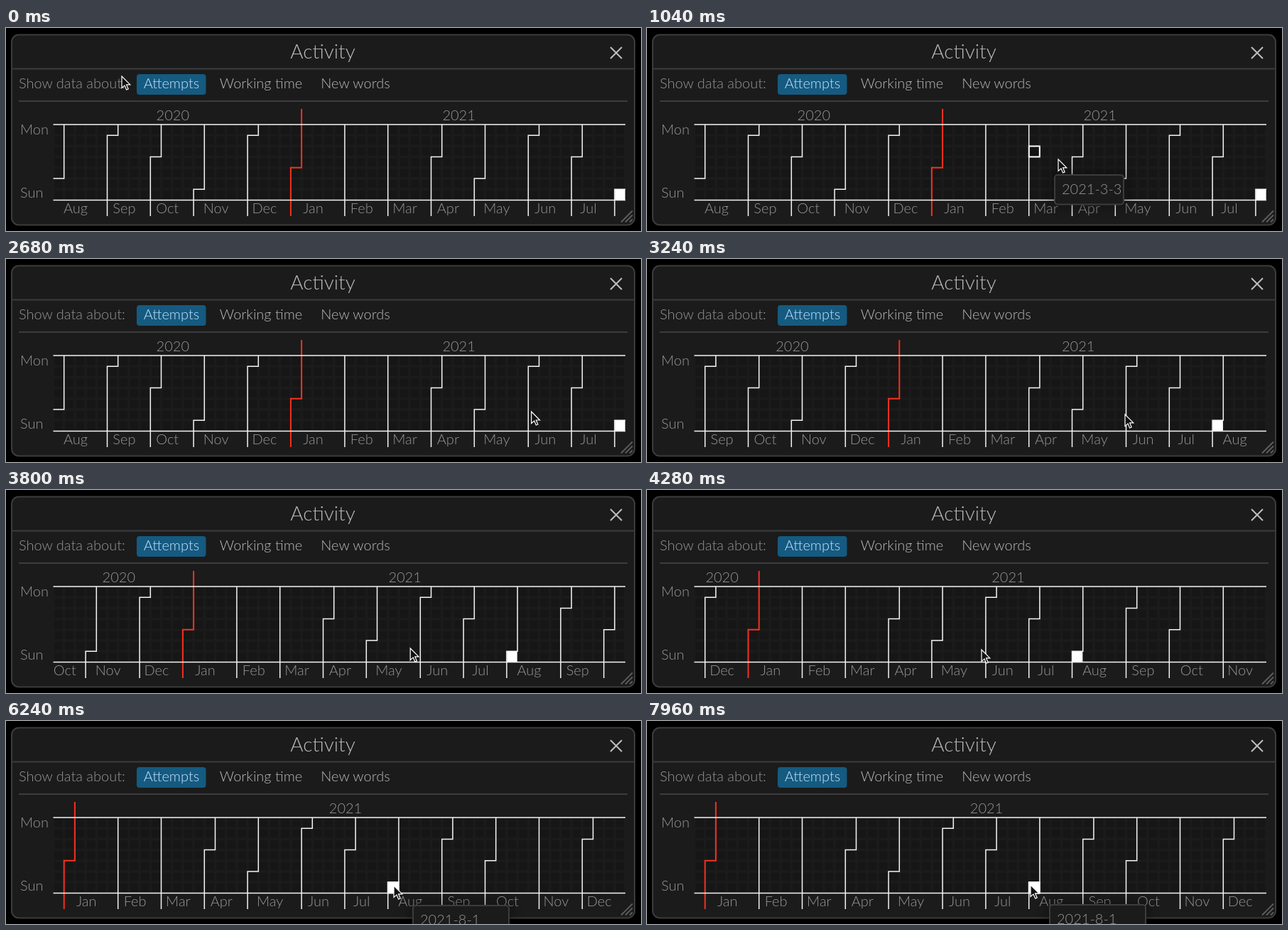
Write an HTML page that moves like this. It is 894 px wide and 286 px high and loops after 8 s.

```html
<!DOCTYPE html>
<html lang="en">
<head>
<meta charset="utf-8">
<title>Activity</title>
<style>
html, body { margin: 0; width: 100%; height: 100%; overflow: hidden; background: #000; }
svg { display: block; width: 894px; height: 286px; }
text { font: 300 20px Lato, sans-serif; fill: #969696; }
.bright { fill: #b9b9b9; }
.mid { text-anchor: middle; }
.edge { stroke: #3c3c3c; stroke-width: 2; }
.line { fill: none; stroke: #f4f4f4; stroke-width: 1.5; }
.year { stroke: #f5301f; stroke-width: 2; }
</style>
</head>
<body>
<svg viewBox="0 0 894 286">
  <defs>
    <pattern id="cells" x="66.5" y="136" width="15.2" height="15.2" patternUnits="userSpaceOnUse">
      <rect x="1.6" y="1.6" width="12" height="12" rx="1" fill="#161616"/>
    </pattern>
    <filter id="blur" x="-50%" y="-80%" width="200%" height="260%"><feGaussianBlur stdDeviation="7"/></filter>
  </defs>
  <rect width="894" height="286"/>
  <rect class="edge" x="8" y="9.5" width="877" height="268" rx="10" fill="#1b1b1b"/>
  <path class="edge" d="M9 57.5H884M18 103H875"/>
  <text class="bright mid" x="446" y="43" style="font-size:28px">Activity</text>
  <path d="M851 27l16 16m0-16l-16 16" stroke="#bebebe" stroke-width="2"/>
  <path d="M866 273.500l16-16M872 273.500l10-10M878 273.500l4-4" stroke="#5f5f5f" stroke-width="1.8"/>

  <text x="18" y="85">Show data about:</text>
  <rect x="184" y="65" width="97.500" height="29" rx="4" fill="#155a80"/>
  <text class="mid" x="233" y="85" style="fill:#c8e4ff">Attempts</text>
  <text class="bright mid" x="359" y="85">Working time</text>
  <text class="bright mid" x="492" y="85">New words</text>

  <text x="20" y="150">Mon</text>
  <text x="20" y="239">Sun</text>
  <rect x="66.500" y="136" width="805.600" height="106.400" fill="url(#cells)"/>
  <g id="chart"></g>
  <rect id="hover" width="15" height="15" fill="#121212" stroke="#fff" stroke-width="2"/>
  <rect id="today" width="14.400" height="14.400" fill="#fff"/>
  <path class="line" d="M66.500 136H872M66.500 242.400H872"/>
  <g id="tip">
    <rect id="shade" x="-6" y="-6" rx="8" opacity=".25" filter="url(#blur)"/>
    <rect id="box" class="edge" rx="4" fill="#1b1b1b"/>
    <text id="date" x="10" y="27"></text>
  </g>
  <path id="cursor" d="M0 0V16.500L4 12.900L6.600 19L9.200 17.900L6.600 11.900H11.800Z" fill="#111" stroke="#fff" stroke-width="1.2"/>
</svg>
<script>
const $ = id => document.getElementById(id);
const LOOP = 8000, STEP = 40, LAG = 120;
const LEFT = 66.5, TOP = 136, CELL = 15.2, COLS = 53, ROWS = 7;
const DAY = 864e5, BASE = Date.UTC(2020, 6, 27), TODAY = 370;
const PRESS = 2200, RELEASE = 5040, GRAB_X = 755;
const MONTHS = 'Jan Feb Mar Apr May Jun Jul Aug Sep Oct Nov Dec'.split(' ');

// Pointer path: time, x, y
const path = [
  [0, 163, 68], [120, 200, 63], [350, 350, 95], [570, 470, 152],
  [720, 521, 174], [920, 547, 179], [1040, 579, 185], [1600, 716, 207],
  [1720, 739, 213], [1800, 755, 214], [2360, 755, 214], [3240, 673, 219],
  [4280, 471, 225], [4560, 428, 218], [5000, 428, 218], [5360, 462, 215],
  [5480, 498, 220], [5720, 513, 225], [6120, 546, 232], [7800, 546, 232],
  [7840, 540, 231], [LOOP, 540, 231]
];

const slope = (i, k) => (path[i + 1][k] - path[i][k]) / (path[i + 1][0] - path[i][0]);

function tangent(i, k) {
  if (i === 0 || i === path.length - 1) return 0;
  const a = slope(i - 1, k), b = slope(i, k);
  return a * b > 0 ? 2 * a * b / (a + b) : 0;
}

// Monotone cubic, so resting points never overshoot
function along(t, k) {
  let i = 0;
  while (i < path.length - 2 && t >= path[i + 1][0]) i++;
  const h = path[i + 1][0] - path[i][0], u = (t - path[i][0]) / h, v = 1 - u;
  return path[i][k] * v * v * (1 + 2 * u) + path[i + 1][k] * u * u * (3 - 2 * u)
    + h * u * v * (tangent(i, k) * v - tangent(i + 1, k) * u);
}

function pointer(t) {
  t = Math.max(0, t);
  return { x: along(t, 1), y: along(t, 2) };
}

const colX = c => LEFT + c * CELL;
const rowY = r => TOP + r * CELL;
const clampCol = c => Math.min(COLS, Math.max(0, c));

function monthStart(i, shift) {
  const days = (Date.UTC(2020, i, 1) - BASE) / DAY, week = Math.floor(days / 7);
  return { col: week - shift, row: days - week * 7 };
}

function label(text, from, to, y) {
  const a = clampCol(from), b = clampCol(to);
  if (b - a < 3) return '';
  return `<text class="mid" x="${colX((a + b) / 2) - 6.5}" y="${y}">${text}</text>`;
}

function border({ col, row }, isYear) {
  if (col < 0 || col >= COLS) return '';
  const x = colX(col), y = rowY(row), top = isYear ? 114 : TOP;
  let d = '';
  if (row === 0) {
    if (col > 0) d = `M${x} ${top}V265`;
  } else {
    d = col > 0 ? `M${x} 265V${y}` : `M${x} ${y}`;
    d += `H${x + CELL}`;
    if (col < COLS - 1) d += `V${top}`;
  }
  return `<path class="line${isYear ? ' year' : ''}" d="${d}"/>`;
}

function chart(shift) {
  let out = '', red = '';
  for (let i = 6; i < 24; i++) {
    const start = monthStart(i, shift), isYear = i % 12 === 0;
    out += label(MONTHS[i % 12], start.col, monthStart(i + 1, shift).col, 261);
    if (isYear) red = border(start, true);
    else out += border(start, false);
  }
  const split = monthStart(12, shift).col + 1;
  return out + red + label('2020', 0, split, 130) + label('2021', split, COLS, 130);
}

function place(el, x, y) {
  el.setAttribute('transform', `translate(${x} ${y})`);
}

function size(el, w, h) {
  el.setAttribute('width', w);
  el.setAttribute('height', h);
}

function showTip(p, day) {
  const date = new Date(BASE + day * DAY);
  const text = `${date.getUTCFullYear()}-${date.getUTCMonth() + 1}-${date.getUTCDate()}`;
  const busy = day === TODAY;
  const w = busy ? 135 : 97 + 11.5 * (text.length - 8), h = busy ? 68 : 41.5;
  $('date').textContent = text;
  size($('box'), w, h);
  size($('shade'), w + 12, h + 12);
  place($('tip'), Math.min(p.x + 27, 892 - w), p.y + 28);
}

let shown = -1;

function draw(time) {
  const t = Math.floor(time % LOOP / STEP) * STEP;
  const c = pointer(t), p = pointer(t - LAG);
  const drag = pointer(Math.min(t, RELEASE - STEP) - LAG).x;
  const shift = t < PRESS ? 0 : Math.max(0, Math.floor((GRAB_X - drag) / CELL));

  if (shift !== shown) {
    $('chart').innerHTML = chart(shift);
    shown = shift;
  }
  place($('today'), colX(52 - shift) + 0.4, rowY(6) + 0.4);
  place($('cursor'), c.x, c.y);

  const col = Math.floor((p.x - LEFT) / CELL), row = Math.floor((p.y - TOP) / CELL);
  const inside = col >= 0 && col < COLS && row >= 0 && row < ROWS;
  const hovering = inside && (t < PRESS || t >= RELEASE);
  $('hover').style.display = $('tip').style.display = hovering ? '' : 'none';
  if (hovering) {
    place($('hover'), colX(col) + 0.1, rowY(row) + 0.1);
    showTip(p, (shift + col) * 7 + row);
  }
}

let begin;
function tick(now) {
  begin ??= now;
  draw(now - begin);
  requestAnimationFrame(tick);
}
draw(0);
requestAnimationFrame(tick);
</script>
</body>
</html>
```
